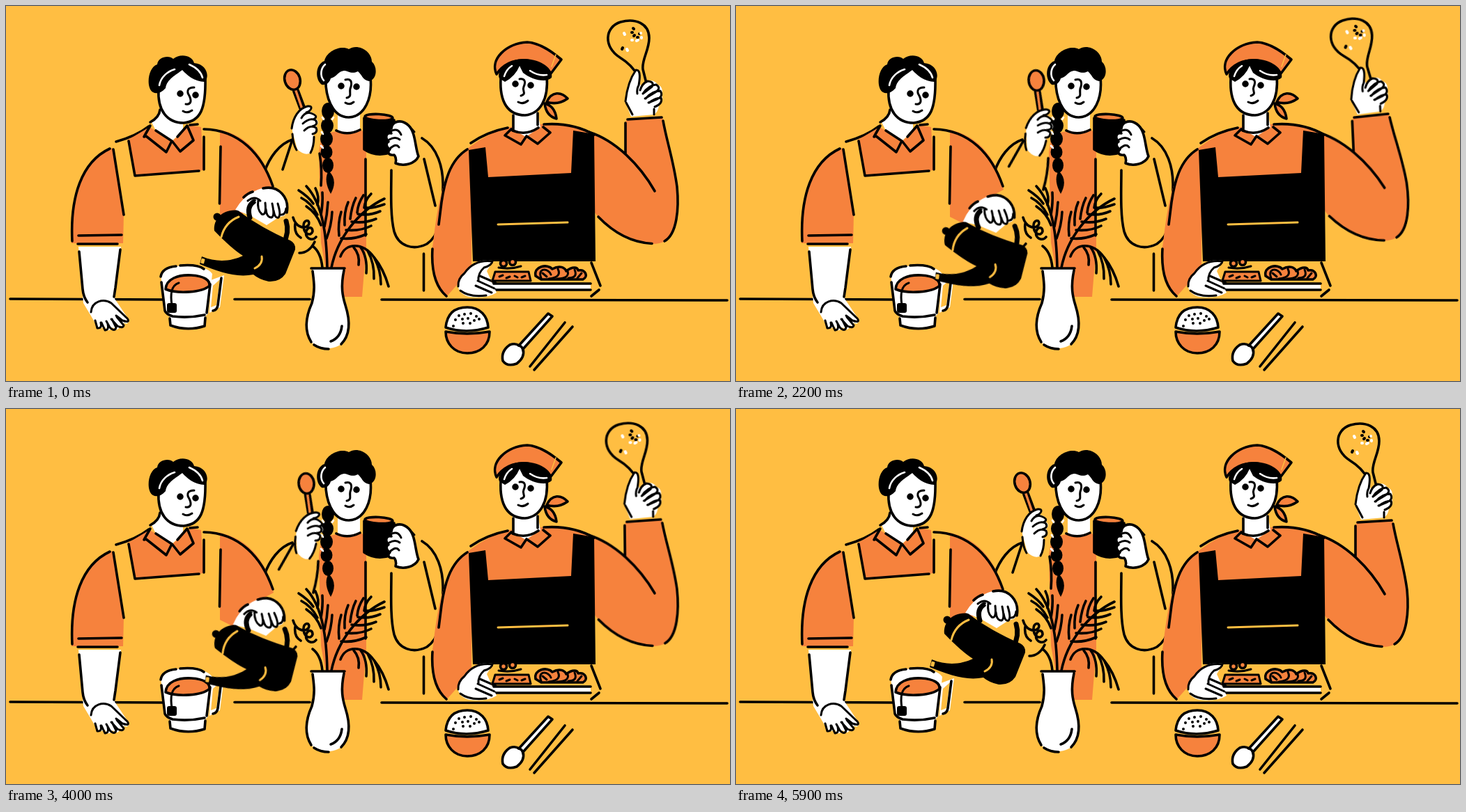
Animation of 1039 by 539 pixels, one loop 6000 ms. Source, as an HTML page:

```html
<!DOCTYPE html>
<html lang="en">
<head>
<meta charset="utf-8">
<title>Three cooks</title>
<style>
html, body { margin: 0; width: 100%; height: 100%; overflow: hidden; background: #ffbe42; }
svg { display: block; width: 100%; height: 100%; }
path, ellipse, circle, rect { stroke-linecap: round; stroke-linejoin: round; stroke-width: 3.6; }
.l { fill: none; stroke: #000; }
.t { stroke-width: 3; }
.hl { fill: none; stroke: #fff; stroke-width: 2.6; }
.yl { fill: none; stroke: #ffbe42; stroke-width: 3; }
.w { fill: #fff; }
.o { fill: #f6823d; }
.k { fill: #000; }
.y { fill: #ffbe42; }
.s { stroke: #000; }
.dots { fill: none; stroke: #000; stroke-width: 4; }
.eyes { stroke-width: 9.5; }

/* Each move advances once per 100 ms, then plays back in reverse. */
#kettle, #stirrer, #waver { animation: 3s infinite alternate; }
#kettle { animation-name: pour; transform-origin: 457px 327px; }
#stirrer { animation-name: stir; transform-origin: 416px 206px; }
#waver { animation-name: wave; transform-origin: 828px 270px; }
@keyframes pour {
  0% { transform: rotate(0deg); animation-timing-function: steps(10); }
  33.3333%, 100% { transform: rotate(-7.5deg); }
}
@keyframes stir {
  0%, 30% { transform: rotate(0deg); animation-timing-function: steps(10); }
  63.3333%, 100% { transform: rotate(11.5deg); }
}
@keyframes wave {
  0%, 60% { transform: rotate(0deg); animation-timing-function: steps(4); }
  73.3333% { transform: rotate(-2.6deg); animation-timing-function: steps(2); }
  80% { transform: rotate(-4deg); animation-timing-function: steps(3); }
  90% { transform: rotate(-7deg); animation-timing-function: steps(3); }
  100% { transform: rotate(-8.9deg); }
}
</style>
</head>
<body>
<svg viewBox="0 0 1039 539" preserveAspectRatio="none">
  <path class="l" d="M6 421L228 422M328 421.500H436M539 422L1035 423"/>

  <g id="woman">
    <path class="o" d="M453 184L475 180Q492 186 508 177L517 184V345L511 418H485L460 385L452 340L449 210Z"/>
    <path class="w" d="M476 156V180Q492 185 508 179V152Z"/>
    <path class="l" d="M474 179Q490 187 508 178M516 220V330M411 192C392 198 378 218 371 238
      M597 190C619 203 628 232 627 262C626 305 622 330 604 342C584 352 563 345 557 324C551 300 553 262 553 236
      M600 220L616 287M599.500 356V409"/>
    <path class="w s" d="M459 98C457 130 468 160 492 160C515 159 526 132 523 103L500 82Z"/>
    <path class="k" d="M453 113C442 104 445 83 457 79C460 65 480 56 492 62C505 53 525 65 525 80C534 88 532 106 521 108C511 106 512 100 505 94C495 99 490 92 485 93C476 94 476 101 466 104C464 111 459 114 453 113Z"/>
    <path class="hl" d="M456 107C450 100 452 89 458 84"/>
    <path class="dots eyes" d="M481 115h0M503 116h0"/>
    <path class="l t" d="M487 106C494 104 497 108 495 116C491 123 498 130 489 132M487 139Q493 143 499 138"/>
    <g class="k">
      <ellipse cx="462" cy="151" rx="9" ry="12"/><ellipse cx="461" cy="172" rx="9" ry="11"/>
      <ellipse cx="460" cy="191" rx="9" ry="11"/><ellipse cx="460" cy="210" rx="8.500" ry="10"/>
      <ellipse cx="462" cy="229" rx="8" ry="11"/><path d="M463 237Q455 250 466 270Q477 250 463 237Z"/>
    </g>
    <path class="hl" d="M454 160L456 163M468 163L470 160M453 181L455 184M452 201L455 204"/>

    <path class="k s" d="M514 161L514 206Q532 218 553 210L557 164Z"/>
    <ellipse class="o s" cx="535" cy="160" rx="20" ry="4.500" transform="rotate(3 535 160)"/>
    <path class="w s" d="M553 176C554 165 568 162 578 172C588 182 587 204 592 216C587 227 571 231 559 226C561 220 558 215 557 214C550 215 546 211 551 206C545 203 545 196 549 195C543 189 546 181 553 183C549 178 550 174 553 176Z"/>
    <path class="l t" d="M552 180Q562 174 567 185M550 192Q559 187 565 192M552 204Q560 197 564 203M578 172L586 181"/>
  </g>

  <g id="stirrer">
    <path class="l" d="M410 195L397 235M450 212Q454 235 452 258M443 339Q435 355 421 355"/>
    <path class="l" style="stroke-width:10" d="M416 122L425 146"/>
    <path fill="none" stroke="#f6823d" style="stroke-width:3.500" d="M415 119L425 148"/>
    <ellipse class="o s" cx="411" cy="106" rx="11" ry="14.500" transform="rotate(-17 411 106)"/>
    <path class="w" d="M411 180C411 160 423 145 434 144C440 144 438 150 434 152C444 153 447 158 443 161C449 164 449 169 445 172C449 178 446 181 442 183L439 210Q430 217 418 206Z"/>
    <path class="l t" d="M410 176C412 160 420 147 433 144C441 143 439 150 431 153M424 161Q430 150 440 155Q449 159 441 163M426 169Q436 160 444 164Q449 170 440 173M428 179Q437 170 445 175Q448 182 440 184M411 184Q412 199 417 207M442 188Q442 202 437 211"/>
  </g>

  <g id="pourer">
    <path class="o" d="M153 204C111 222 93 270 94 341H168L169 300Z"/>
    <path class="l" d="M149 205C108 224 92 275 95 338M154 206L169 300M158 195Q187 187 205 173M104 330L166 329M103 342H160"/>
    <path class="w" d="M104 346H165L156 421Q165 434 177 452Q174 459 169 455Q172 464 163 459Q162 469 153 462Q146 471 142 461Q133 466 130 459Q120 442 111 427Z"/>
    <path class="l" d="M105 353L110 407Q111 418 117 426M164 350L157 405L155 418"/>
    <path class="l t" d="M122 440C123 424 140 420 151 427L174 449Q179 456 167 452L158 445M159 447L169 459Q168 464 160 460L151 450M152 450L158 462Q156 469 149 462L144 453M146 457Q148 466 142 466L137 455M136 455Q138 464 131 463L128 452"/>

    <path class="o" d="M174 193L206 174L240 193L263 171L280 174L284 236L185 244Z"/>
    <path class="w" d="M221 146Q222 160 209 167L214 177L238 194L254 180V164Z"/>
    <path class="l" d="M176 194L185 244L277 237M284 188V235M221 149Q220 160 207 167M207 172L198 188L201 187L230 210L238 194L215 179M239 195L250 209L269 193L260 172L246 188M264 171L275 170"/>
    <path class="w s" d="M219 119C217 150 231 168 255 168C279 166 287 148 286 103L250 88Z"/>
    <path class="k" d="M211 124C200 117 204 88 217 84C218 73 234 70 240 76C249 68 267 70 270 82C288 83 293 102 285 109C271 109 259 99 253 92C244 99 231 105 229 118C223 125 216 127 211 124Z"/>
    <path class="hl" d="M220 114C222 102 232 94 242 91M263 84Q279 91 282 103"/>
    <path class="dots eyes" d="M250 126h0M272 128h0"/>
    <path class="l t" d="M270 117C260 117 259 123 263 129C267 137 265 142 258 141M254 151Q260 155 267 150"/>

    <path class="o" d="M307 178C350 187 375 222 384 264L348 283L331 315L307 303Z"/>
    <path class="l" d="M284 177C335 178 367 213 383 259M308 202L306.500 284"/>
  </g>

  <g id="cup">
    <path class="w" d="M222 386C225 370 285 368 296 385L290 442L285 447V461Q260 468 235 461V447L228 440Z"/>
    <path class="w" d="M294 394L313 387L307 433L292 441Z"/>
    <path class="y" d="M297 402L307 393L302 430L294 433Z"/>
    <path class="l" d="M222 389Q224 376 244 374M250 373Q275 371 284 378M223 397L228 438Q230 443 239 446Q262 449 285 444M293 400L288 441M235 449L236 459Q260 468 285 460L286 448M309 391L304 430Q303 437 297 438"/>
    <path class="o s" d="M229 407C230 392 247 386 266 387C284 388 293 394 292 402C282 412 246 414 229 407Z"/>
    <rect class="k" x="231" y="427" width="14" height="14" rx="3"/>
    <path class="l t" d="M238 430C236 416 236 402 248 398"/>
  </g>

  <g id="kettle">
    <path class="w" d="M329 293Q340 274 357 266Q375 257 391 264Q405 273 403 294Q401 304 394 302L374 315L350 301Z"/>
    <path class="l" style="stroke-width:7" d="M350 304Q345 288 356 281M402 309Q407 325 398 342"/>
    <path class="k" d="M299 323C297 306 312 291 333 294C357 312 380 325 408 337Q416 341 415 350L401 385Q393 397 377 396Q363 393 355 386C330 391 305 382 278 371L281 360C303 369 323 367 340 359Q324 349 299 323Z"/>
    <circle class="k" cx="303" cy="303" r="5.500"/>
    <path class="yl" d="M309 332Q314 311 334 303M367 360Q369 371 357 377"/>
    <rect class="y" x="280" y="363" width="5" height="7" rx="1" transform="rotate(15 282 366)"/>
    <path class="l" d="M341 275Q347 269 354 267M369 262C392 257 407 276 403 297"/>
    <path class="w" d="M358 280L364 300L373 302L376 305L386 306L397 302L398 280Z"/>
    <path class="l t" d="M347 280Q357 272 365 280M362 279Q360 293 367 299Q374 302 372 283M373 292Q374 304 381 304Q386 302 382 284M384 294Q386 306 391 304Q395 300 390 284M395 300Q401 300 402 291"/>
  </g>

  <g id="plant" class="l t">
    <path d="M461 376C460 330 455 285 431 259M467 376C475 335 505 295 543 277M480 360C487 340 512 339 528 361Q542 378 549 403M454 376Q452 354 440 345"/>
    <path d="M420 265Q434 274 441 284M424 276Q438 283 447 300M431 288Q446 298 452 315M444 262Q450 274 447 286M454 268Q455 283 452 300M462 282Q461 300 457 317M468 296Q467 316 460 334"/>
    <path d="M491 282Q485 296 486 315M502 276Q496 288 494 306M513 272Q505 284 504 297M524 270Q515 279 514 290M481 296Q476 312 478 330M543 285Q527 291 516 290M537 295Q521 302 505 299M531 306Q514 313 496 310M524 316Q508 324 488 322M517 328Q499 336 481 334"/>
    <path d="M499 347Q508 357 506 372M509 347Q519 361 517 384M519 352Q529 370 528 392M529 363Q538 380 538 400"/>
    <path d="M412 304C416 318 428 321 434 315C438 306 426 306 427 317C428 329 438 331 440 324C440 314 428 319 431 330C434 336 441 337 445 332M415 313Q413 327 423 333"/>
  </g>
  <g id="vase">
    <path class="w" d="M439 377H486C483 395 480 408 486 426C497 456 493 478 478 488C464 495 449 493 440 485C427 468 434 447 440 425C445 405 440 394 439 377Z"/>
    <path class="l" d="M438 377H486M440 381C442 397 444 408 439 427C430 447 428 467 438 483M442 487Q451 493 463 493M485 380C480 404 483 417 487 430C495 455 493 474 481 486M482 460Q480 477 466 482"/>
  </g>

  <g id="waver">
    <path class="o" d="M818 178C850 183 876 201 890 216V163L942 160C950 196 965 242 965 290C964 322 953 342 929 342C892 336 866 319 848 301L826 270Z"/>
    <path class="l" d="M836 181C875 193 910 229 931 266M850 303C874 328 899 340 927 341.500M945 338C963 328 966 291 963 260C958 222 948 194 943 165M892 163L941 160M889 168V213"/>
    <path class="y s" d="M907 101Q899 85 881 74C857 59 859 30 882 23C903 17 923 25 923 46C923 64 912 77 914 91L919 111"/>
    <path class="dots" d="M900 32l1 1M902 42l-1 1M909 40h0M885 60l-1 2M906 45l1 0M898 38l1 0"/>
    <path class="dots" style="stroke:#fff" d="M887 39l1 2M898 49l1 0M905 50l2-1M912 45l0 1M891 62l1 2M911 39h0"/>
    <path class="w" d="M904 92Q911 91 909 109L911 115L917 109Q930 104 935 113Q944 116 941 128Q945 137 937 143Q936 152 930 156L897 159L889 138Q892 112 904 92Z"/>
    <path class="l t" d="M889 137Q892 109 904 92C912 91 909 108 908 114Q905 119 906 126M910 121Q913 111 921 108Q931 109 927 116L914 126M914 126Q922 114 933 113Q941 118 932 124L917 133M918 133Q927 122 939 122Q944 130 934 134L922 139M923 139Q932 132 940 132Q943 140 931 145M890 139L899 156M930 148V156"/>
  </g>

  <g id="server">
    <path class="o" d="M722 174L765 170C800 168 826 176 846 187L840 260H668V380L648 400L632 418C611 405 608 370 613 340C620 280 630 222 665 203Q692 182 722 174Z"/>
    <path class="k" d="M664 207L688 203L692 246L811 240L814 179L844 184L846 367H670Z"/>
    <path class="yl" d="M706 314L806 311"/>
    <path class="w" d="M727 152V177L746 188L767 174L763 152Z"/>
    <path class="l" d="M772 170C800 168 825 174 844 185M720 175Q690 181 667 197M662 206C636 222 629 255 625 282L621 314M612 349C610 382 617 404 632 417M728 157V178M763 154V171M725 177L716 186L739 199L747 187L763 198L781 182L771 174M727 179Q746 187 764 175"/>
    <path class="w s" d="M710 104C708 139 721 157 745 157C766 155 779 135 776 100L742 80Z"/>
    <path class="o s" d="M704 98C694 77 717 54 748 52C767 53 785 67 797 77L782 97C763 74 723 69 704 98Z"/>
    <path class="k" d="M708 104C703 91 722 75 745 76C768 77 786 90 783 103C775 111 754 106 742 96L737 86Q731 101 716 109Z"/>
    <path class="hl" d="M715 101Q718 91 726 86M752 93Q764 101 776 99"/>
    <path class="yl" d="M789 70L783 87" style="stroke-width:1.500"/>
    <path class="dots eyes" d="M731 112h0M753 114h0"/>
    <path class="l t" d="M737 105C745 104 746 109 743 116C740 122 748 126 739 129M735 138Q742 142 749 136"/>
    <path class="o s" d="M776 138C783 122 797 123 806 133Q792 143 776 138ZM773 140Q788 144 790 162Q775 158 773 140Z"/>

    <path class="y" d="M697 367H839L854 404L839 418H705L695 398Z"/>
    <path class="w" d="M699 399H839V408H699Z"/>
    <path class="l" d="M699 399H839M702 408H839M840 369L853 402M851 408L840 417"/>
    <path class="w" d="M699 366Q674 362 659 382L648 397Q648 414 665 418Q690 421 704 412L690 381Z"/>
    <path class="l t" d="M698 367Q672 364 658 384Q648 392 649 403M698 367Q697 373 686 376Q677 384 678 395M680 388L703 398M677 395L701 406M674 402L697 412M652 409Q665 419 689 416"/>

    <path class="o" d="M702 382H750L754 396H696Z"/>
    <path class="l t" d="M702 382H750L753 395H698ZM708 389l5-2M718 391l5-2M730 388l4 2M740 390l5-2M707 376Q724 379 739 374"/>
    <circle class="o s" cx="714" cy="370" r="4.500"/><circle class="o s" cx="727" cy="368" r="4.500"/>
    <path class="o s" d="M760 388C757 374 777 370 784 378C795 372 802 376 804 381C813 374 820 375 821 380C832 378 836 389 828 393H768Z"/>
    <path class="l t" d="M768 391C762 376 778 376 782 386M779 392Q798 390 792 378M791 392Q809 392 806 381M807 391Q821 391 816 379M820 391L826 384M770 384L776 389"/>
  </g>

  <g id="tableware">
    <path class="w s" d="M631 462C633 441 645 433 662 433C681 433 691 446 692 462Q660 472 631 462Z"/>
    <path class="o s" d="M631 468Q661 474 694 468C694 488 680 499 662 499C643 499 631 485 631 468Z"/>
    <path class="dots" d="M650 445h0M658 443h0M667 442h0M675 446h0M645 451h0M655 450h0M663 449h0M672 452h0M679 450h0M642 460h0M656 456h0M666 456h0"/>
    <path class="w s" d="M736 488L778 442L784 446L742 493Q745 505 733 514Q719 519 713 510Q710 496 723 487Q731 484 736 488Z"/>
    <path class="l" d="M736 488Q741 489 742 495M752 518L802 455M758 523L813 461"/>
  </g>
</svg>
</body>
</html>
```
